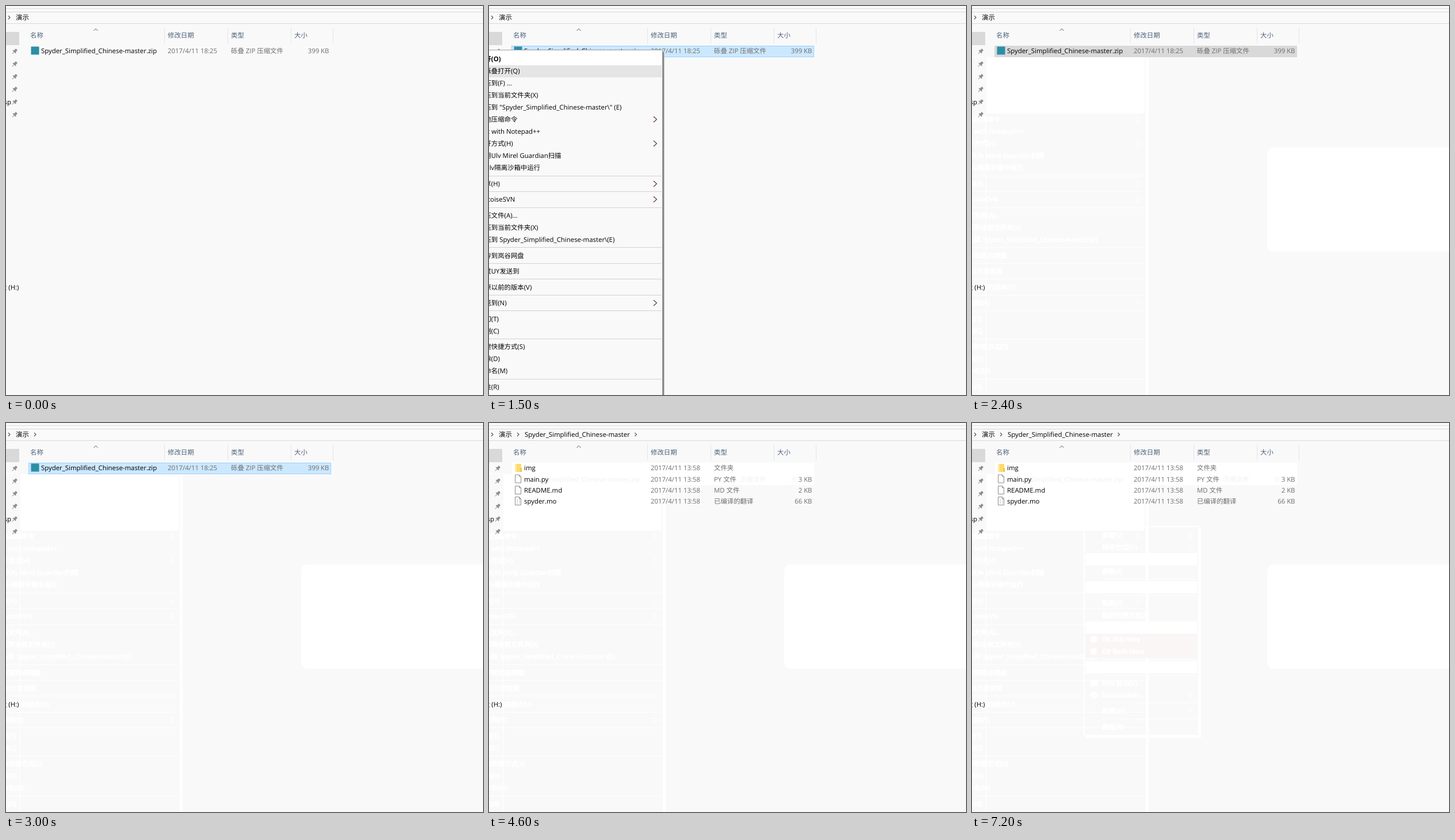
An HTML page for the animation above (8 s loop, 829 by 676 pixels).

```html
<!DOCTYPE html>
<html lang="zh-CN">
<head>
<meta charset="utf-8">
<title>演示</title>
<style>
html, body { margin: 0; width: 100%; height: 100%; overflow: hidden; background: #f9f9f9; }
svg { display: block; }
text { font: 11.4px "Open Sans", "Noto Sans", "Noto Sans CJK SC", "Noto Sans CJK", sans-serif; white-space: pre; text-rendering: geometricPrecision; }
.bold { font-weight: 700; }
.ghost text { fill: #fff; stroke: #fff; stroke-width: .9; }
</style>
</head>
<body>
<svg id="stage" width="829" height="676" viewBox="0 0 829 676"></svg>
<script>
const NAME = 'Spyder_Simplified_Chinese-master';
const GREY = '#6d6d6d';

const rect = (x, y, w, h, fill, extra = '') =>
  `<rect x="${x}" y="${y}" width="${w}" height="${h}" fill="${fill}" ${extra}/>`;
const path = (d, stroke, width = 1, fill = 'none') =>
  `<path d="${d}" stroke="${stroke}" stroke-width="${width}" fill="${fill}"/>`;
const label = (x, y, s, fill = '#000', extra = '') =>
  `<text x="${x}" y="${y + 4}" fill="${fill}" ${extra}>${s}</text>`;
const group = (id, body, cls = '') => `<g id="${id}" class="${cls}">${body}</g>`;
const crumb = x => path(`M${x - 1.5} 17l3 3-3 3`, '#555', 1.2);
const END = 'text-anchor="end"';

// Icons
const square = (x, y, size, fill) => rect(x - size / 2, y - size / 2, size, size, fill);
const zipIcon = y => square(50.5, y - .5, 14, '#2b8fa6');
const folderIcon = y => rect(45, y - 7, 11, 14, '#ffd96b') + rect(45, y - 7, 3, 14, '#ffe9a4')
  + rect(54, y, 3, 7, '#f5c64c');
const fileIcon = y => path(`M45.5 ${y - 7.5}h7l3 3v11h-10z`, '#8c8c8c', 1, '#fff')
  + path(`M52.5 ${y - 7.5}v3h3`, '#8c8c8c');
const moIcon = y => fileIcon(y) + path(`M48 ${y - 3}h2m2 0h2M48 ${y}h2m2 0h2M48 ${y + 3}h2m2 0h2`, '#aaa');
const pin = y => `<g transform="translate(15 ${y}) rotate(45)">`
  + rect(-2, -5, 4, 5, '#8a8f96') + rect(-3.5, -.5, 7, 1.8, '#8a8f96') + rect(-.5, 1, 1, 5, '#8a8f96') + '</g>';

const fileRow = (y, icon, name, date, type, size = '') => icon(y) + label(61, y, name)
  + label(281, y, date, GREY) + label(391, y, type, GREY) + label(561.5, y, size, GREY, END);
const zipRow = y => fileRow(y, zipIcon, NAME + '.zip', '2017/4/11 18:25', '砾叠 ZIP 压缩文件', '399 KB');

// Menu items: [centre y, text, flag]; > submenu, b bold, d disabled
const fileMenu = {
  x: -19, left: 0, right: 300, arrow: 286,
  seps: [295, 322, 350, 419, 447, 474, 502, 529, 578, 648],
  items: [
    [92, '打开(O)', 'b'], [113, '用砾叠打开(Q)'], [134, '解压到(F) ...'], [155, '解压到当前文件夹(X)'],
    [176, `解压到 "${NAME}\\" (E)`], [197, '其他压缩命令', '>'], [218, 'Edit with Notepad++'],
    [239, '打开方式(H)', '>'], [260, '使用Ulv Mirel Guardian扫描'], [281, '在Ulv隔离沙箱中运行'],
    [309, '共享(H)', '>'], [336, 'TortoiseSVN', '>'], [364, '解压文件(A)...'], [385, '解压到当前文件夹(X)'],
    [406, `解压到 ${NAME}\\(E)`], [434, '上传到岚谷网盘'], [461, '通过UY发送到'], [489, '还原以前的版本(V)'],
    [516, '发送到(N)', '>'], [544, '剪切(T)'], [565, '复制(C)'], [592, '创建快捷方式(S)'],
    [613, '删除(D)'], [634, '重命名(M)'], [662, '属性(R)']
  ]
};
const folderMenu = {
  x: 226, left: 226, right: 391, arrow: 377,
  seps: [271, 299, 411, 438, 486, 514],
  items: [
    [195, '查看(V)', '>'], [216, '排序方式(O)', '>'], [237, '分组依据(P)', '>'], [258, '刷新(E)'],
    [285, '自定义文件夹(F)...'], [313, '粘贴(P)', 'd'], [334, '粘贴快捷方式(S)', 'd'], [355, '撤消 删除(U)'],
    [376, 'Git GUI Here'], [397, 'Git Bash Here'], [424, '共享(H)', '>'], [452, 'SVN 检出(K)...'],
    [473, 'TortoiseSVN', '>'], [500, '新建(W)', '>'], [528, '属性(R)']
  ]
};

function drawMenu(menu, ghost) {
  const line = ghost ? '#fff' : '#d2d2d2';
  const arrow = ghost ? '#fff' : '#5c2a55';
  return menu.seps.map(y => rect(menu.left, y, menu.right - menu.left, 1, line)).join('')
    + menu.items.map(([y, s, flag]) =>
      label(menu.x, y, s, flag === 'd' ? GREY : '#000', flag === 'b' ? 'class="bold"' : '')
      + (flag === '>' ? path(`M${menu.arrow} ${y - 5}l5.5 5-5.5 5`, arrow, 1.1) : '')).join('');
}
const menuIcons = (git, checkout, svn) => square(211.5, 376, 10, git) + square(211.5, 397, 10, git)
  + square(212, 452, 12, checkout) + `<circle cx="212" cy="473" r="6.5" fill="${svn}"/>`;

// Pointer over menu rows: [time, row centre]; times are tenths of a second
const hovers = {
  file: { x: 0, w: 300, end: 21, steps: [[14, 92], [15, 113], [16, 134], [17, 155], [18, 176]] },
  folder: {
    x: 197, w: 194, end: 72,
    steps: [[63, 397], [64, 424], [65, 397], [66, 355], [67, 285], [68, 236], [69, 397]]
  }
};
const hoverRects = key => hovers[key].steps.map(([, y], i) =>
  rect(hovers[key].x, y - 10, hovers[key].w, 21, '#e5e5e5', `id="${key}${i}"`)).join('');

const header = [[42, '名称'], [281, '修改日期'], [391, '类型'], [501, '大小']];
const date = '2017/4/11 13:58';

const base = rect(0, 4, 829, 1, '#dedede') + rect(0, 10, 829, 1, '#d9d9d9') + rect(0, 30, 829, 1, '#d9d9d9')
  + crumb(5.5) + label(17, 20, '演示')
  + header.map(([x, s]) => label(x, 51, s, '#4c607a')).join('')
  + [275, 385, 495, 568].map(x => rect(x, 38, 1, 27, '#e5e5e5')).join('')
  + path('M152.5 43l3.5-3.5 3.5 3.5', '#555');
const nav = rect(0, 45, 23, 23, '#d9d9d9') + [79, 101, 123, 145, 167, 189].map(pin).join('')
  + label(9, 167, 'sp', '#000', END) + label(22.5, 489, '盘 (H:)', '#000', END);

const fileGhost = drawMenu(fileMenu, true)
  + rect(25, 89, 275, 98, '#fff') + rect(0, 89, 25, 98, '#f9f9f9')
  + rect(24, 187, 1, 489, '#fff') + rect(302, 89, 5, 587, '#fff');
const folderGhost = rect(197, 365, 194, 43, '#fbf6f6') + drawMenu(folderMenu, true)
  + menuIcons('#fff', '#fff', '#fff')
  + [236, 285, 355, 424].map(y => rect(197, y - 10, 194, 21, '#fff')).join('')
  + rect(194, 179, 200, 2, '#fff') + rect(194, 179, 2, 364, '#fff')
  + rect(393, 182, 5, 365, '#fff') + rect(197, 542, 201, 5, '#fff');

const files = fileRow(78, folderIcon, 'img', date, '文件夹')
  + fileRow(97.5, fileIcon, 'main.py', date, 'PY 文件', '3 KB')
  + fileRow(117, fileIcon, 'README.md', date, 'MD 文件', '2 KB')
  + fileRow(136, moIcon, 'spyder.mo', date, '已编译的翻译', '66 KB');
const faintRow = '<clipPath id="rest"><path d="M104 89h172v19h-172zM436 89h99v19h-99z"/></clipPath><g clip-path="url(#rest)">'
  + label(61, 97.5, NAME + '.zip', '#f0f0f0') + label(391, 97.5, '砾叠 ZIP 压缩文件', '#f0f0f0')
  + label(561.5, 97.5, '399 KB', '#f0f0f0', END) + '</g>';

const stage = document.getElementById('stage');
stage.innerHTML = base
  + group('fileGhost', fileGhost, 'ghost')
  + rect(513, 246, 330, 181, '#fff', 'rx="11" id="dialogGhost"')
  + group('nav', nav)
  + group('whiteRows', rect(40, 69, 525, 39, '#fff'))
  + rect(39.5, 69.5, 525, 19, 'none', 'id="rowOne"')
  + group('zipFirst', zipRow(78))
  + group('extracted', fileRow(78, folderIcon, NAME, date, '文件夹') + zipRow(97.5))
  + group('crumbTwo', crumb(50.5))
  + group('opened', label(62, 20, NAME) + faintRow + files)
  + group('crumbThree', crumb(255))
  + group('fileMenu', rect(0, 76, 302, 600, '#f9f9f9') + rect(0, 77, 301, 5, '#fff')
    + rect(0, 76, 302, 1, '#a0a0a0') + rect(301, 77, 1, 599, '#a0a0a0')
    + hoverRects('file') + drawMenu(fileMenu))
  + group('fileShadow', rect(302, 80, 1, 596, '#808080')
    + rect(303, 81, 1, 595, '#8a8a8a') + rect(304, 82, 1, 594, '#c8c8c8'))
  + group('folderGhost', folderGhost, 'ghost')
  + group('folderMenu', rect(394, 183, 1, 361, '#888') + rect(395, 184, 1, 361, '#b0b0b0') + rect(396, 185, 1, 361, '#e0e0e0')
    + rect(198, 543, 197, 1, '#888') + rect(199, 544, 197, 1, '#b0b0b0') + rect(200, 545, 197, 1, '#e0e0e0')
    + rect(194.5, 179.5, 199, 363, 'none', 'stroke="#a0a0a0"')
    + hoverRects('folder') + drawMenu(folderMenu) + label(343, 355, 'Ctrl+Z')
    + menuIcons('#74a9de', '#5fa52f', '#4b5875'));

// [id, [time, opacity]...]
const tracks = [
  ['zipFirst', [0, 1], [32, 0]],
  ['fileMenu', [0, 0], [10, .34], [11, .68], [12, 1], [21, 0]],
  ['fileShadow', [0, 0], [10, 1], [21, 0]],
  ['fileGhost', [0, 0], [21, 1]],
  ['dialogGhost', [0, 0], [22, 1]],
  ['crumbTwo', [0, 0], [29, 1]],
  ['whiteRows', [0, 0], [32, 1]],
  ['extracted', [0, 0], [32, 1], [39, 0]],
  ['opened', [0, 0], [39, 1]],
  ['crumbThree', [0, 0], [41, 1]],
  ['folderMenu', [0, 0], [55, .5], [56, 1], [72, 0]],
  ['folderGhost', [0, 0], [72, 1]]
].map(([id, ...steps]) => [document.getElementById(id), steps]);

const plain = ['none', 'none'], hot = ['#e5f3ff', '#e5f3ff'], picked = ['#cce8ff', '#99d1ff'], idle = ['#d9d9d9', '#d9d9d9'];
const rowSteps = [[0, plain], [1, hot], [4, picked], [22, idle], [26, picked], [32, plain],
  [33, hot], [36, picked], [39, hot], [46, plain]];
const rowOne = document.getElementById('rowOne');

const at = (steps, t) => steps.filter(([time]) => time <= t).pop()[1];

// A row the pointer has left keeps a white background
function paintHover(key, t) {
  const { steps, end } = hovers[key];
  steps.forEach(([time], i) => {
    const el = document.getElementById(key + i);
    const next = i + 1 < steps.length ? steps[i + 1][0] : end;
    el.setAttribute('opacity', t >= time ? 1 : 0);
    el.setAttribute('fill', t < next ? '#e5e5e5' : '#fff');
  });
}

function paint(t) {
  for (const [el, steps] of tracks) el.setAttribute('opacity', at(steps, t));
  const [fill, stroke] = at(rowSteps, t);
  rowOne.setAttribute('fill', fill);
  rowOne.setAttribute('stroke', stroke);
  paintHover('file', t);
  paintHover('folder', t);
}

const start = performance.now();
let shown = -1;
function tick() {
  const t = Math.floor((performance.now() - start) % 8000 / 100);
  if (t !== shown) paint(shown = t);
  requestAnimationFrame(tick);
}
tick();
</script>
</body>
</html>
```
